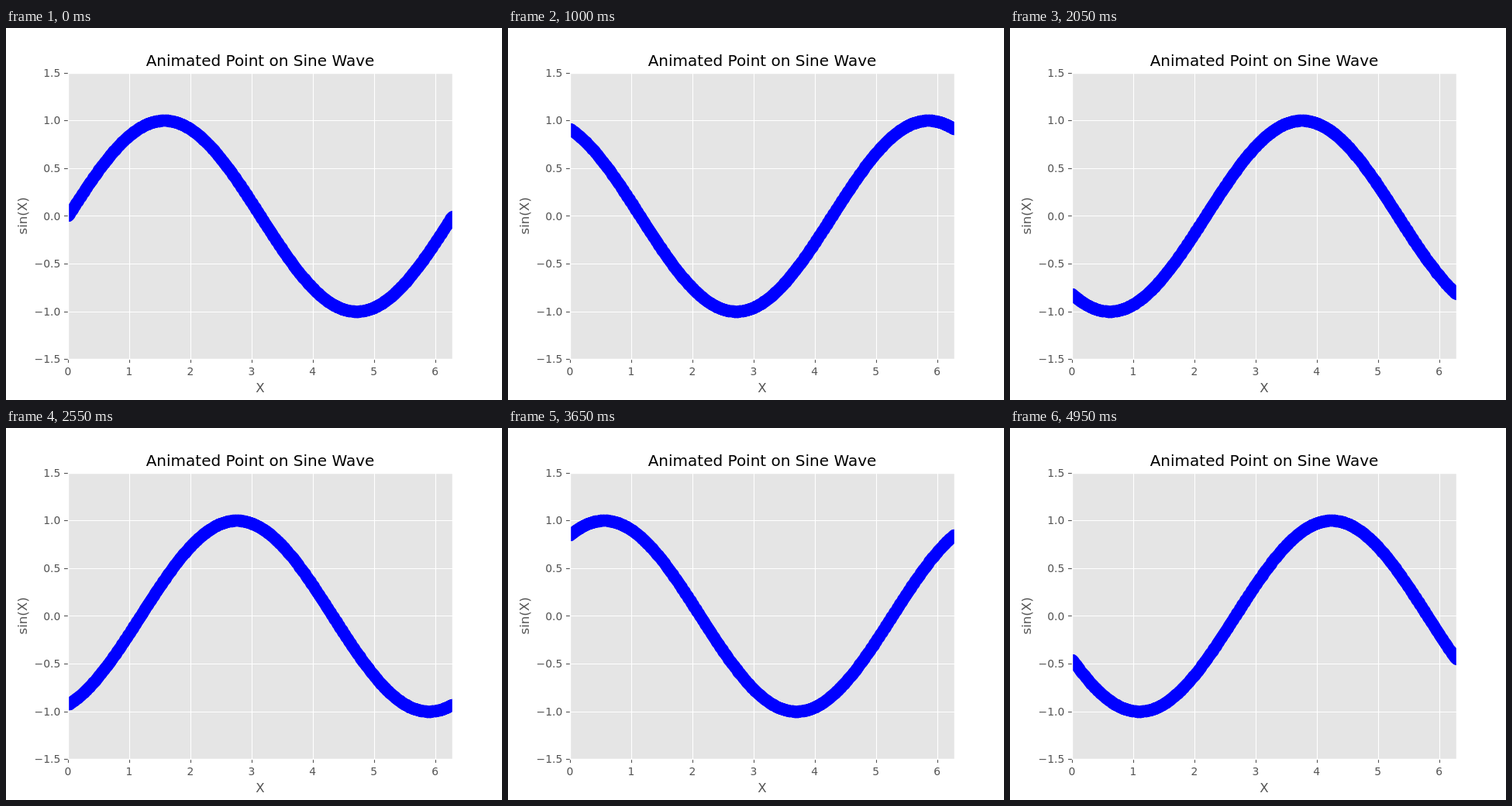
An HTML page with a canvas that plays this animation: 640x480 px, repeating every 5000 ms.

```html
<!DOCTYPE html>
<html lang="en">
<head>
<meta charset="utf-8">
<title>Animated Point on Sine Wave</title>
<style>
  html, body { margin: 0; width: 100%; height: 100%; overflow: hidden; background: #fff; }
  svg, canvas { position: absolute; left: 0; top: 0; width: 640px; height: 480px; }
  text { font-family: "DejaVu Sans", sans-serif; font-size: 13.89px; fill: #555; text-anchor: middle; }
  .label { font-size: 16.67px; }
  .title { font-size: 20px; fill: #000; }
  .end { text-anchor: end; }
  .grid { stroke: #fff; stroke-width: 1.11; }
  .tick { stroke: #555; stroke-width: 1.11; }
</style>
</head>
<body>
<svg id="chart" viewBox="0 0 640 480">
  <rect x="80" y="58" width="496" height="369" fill="#e5e5e5"/>
  <text class="title" x="328" y="49">Animated Point on Sine Wave</text>
  <text class="label" x="328" y="470">X</text>
  <text class="label" transform="translate(27 242.4) rotate(-90)">sin(X)</text>
</svg>
<canvas id="wave" width="640" height="480"></canvas>
<script>
const LEFT = 80, RIGHT = 576, TOP = 57.6, BOTTOM = 427.2;
const TAU = 2 * Math.PI;
const STEP_MS = 50, STEPS = 100, RADIUS = 7.64;

const px = x => LEFT + x / TAU * (RIGHT - LEFT);
const py = y => (TOP + BOTTOM) / 2 - y / 3 * (BOTTOM - TOP);
const snap = v => Math.round(v) + 0.5;

const chart = document.getElementById('chart');

function add(tag, attrs, text = '') {
  const el = document.createElementNS(chart.namespaceURI, tag);
  for (const key in attrs) el.setAttribute(key, attrs[key]);
  el.textContent = text;
  chart.append(el);
}

const line = (cls, x1, y1, x2, y2) => add('line', { class: cls, x1, y1, x2, y2 });

for (let i = 0; i <= 6; i++) {
  const x = snap(px(i));
  line('grid', x, 58, x, 427);
  line('tick', x, 427, x, 432);
  add('text', { x: px(i), y: 448 }, i);

  const value = i / 2 - 1.5;
  const y = snap(py(value));
  line('grid', 80, y, 576, y);
  line('tick', 75, y, 80, y);
  add('text', { class: 'end', x: 70.3, y: Math.round(py(value) + 5.15) },
    value.toFixed(1).replace('-', '\u2212'));
}

const ctx = document.getElementById('wave').getContext('2d');
ctx.fillStyle = '#00f';
ctx.strokeStyle = '#fff';
ctx.lineWidth = 1.39;

// Dots sit on whole pixels, which gives the band its slightly stepped edge.
function draw(phase) {
  ctx.clearRect(0, 0, 640, 480);
  ctx.save();
  ctx.beginPath();
  ctx.rect(LEFT, 58, RIGHT - LEFT, 369);
  ctx.clip();
  for (let i = 0; i < 629; i++) {
    const x = i / 100;
    ctx.beginPath();
    ctx.arc(snap(px(x)), snap(py(Math.sin(x + phase))), RADIUS, 0, TAU);
    ctx.fill();
  }
  ctx.restore();
  ctx.strokeRect(80.5, 58.5, 496, 369);
}

let shown = -1;
function tick() {
  const step = Math.floor(performance.now() / STEP_MS) % STEPS;
  if (step !== shown) {
    shown = step;
    draw(step / 10);
  }
  requestAnimationFrame(tick);
}
tick();
</script>
</body>
</html>
```
